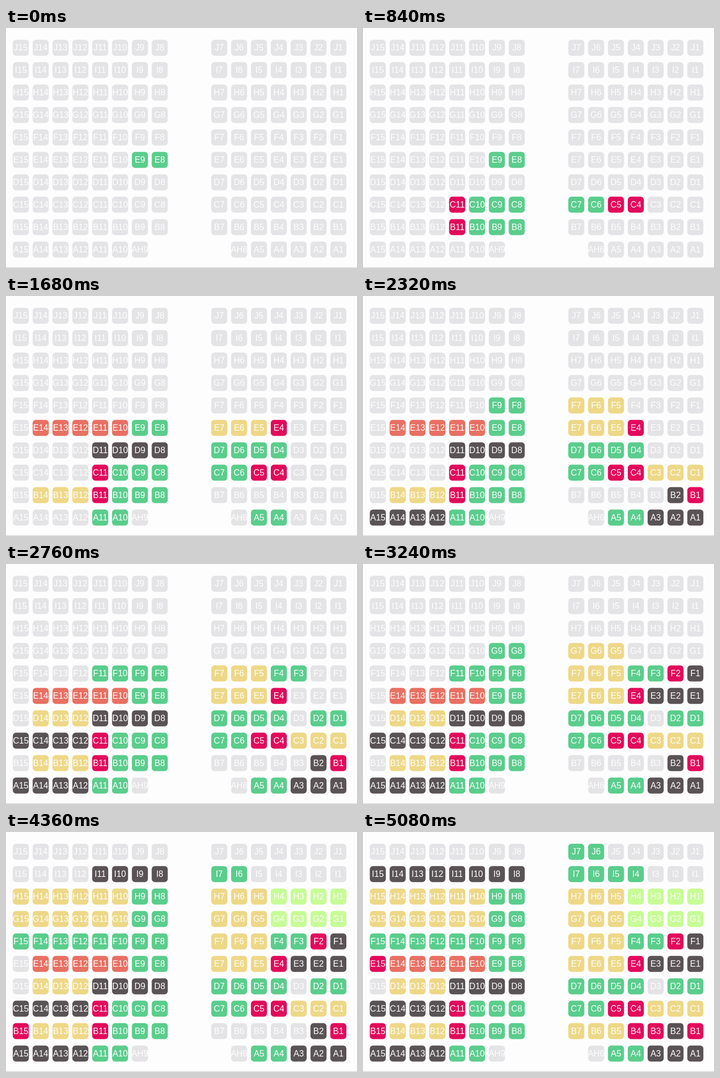
An HTML page for the animation above (5120 ms loop, 656 by 449 pixels).

```html
<!DOCTYPE html>
<html lang="en">
<head>
<meta charset="utf-8">
<title>Seat bookings</title>
<style>
  html, body { margin: 0; width: 100%; height: 100%; overflow: hidden; background: #fefdfe; }
  svg { display: block; }
  text { font: 16px "Liberation Sans", Arial, sans-serif; fill: #fefdfe; text-anchor: middle; }
</style>
</head>
<body>
<svg id="hall" width="656" height="449" viewBox="0 0 656 449">
  <rect y="447.5" width="656" height="1.5" fill="#dddcde"/>
</svg>
<script>
const LOOP = 5120, INTERVAL = 100, LEAD = 50;
const FREE = '#e4e3e5';
const COLOR_BY_SIZE = {
  1: '#e20a5b', 2: '#5acd8c', 3: '#edd887', 4: '#5a5355', 5: '#e87062', 8: '#c7fc96'
};

// One party per entry, in order of arrival; "E14-10" is a run of seats, "+" joins runs.
const bookings = `
  E9-8 C9-8 C7-6 B9-8 C10+B10 C11 B11 C5 C4
  E7-5 D11-8 D7-6 D5-4 E4 B14-12 A11-10 E14-10 A5-4
  A15-12 F9-8 A3-1+B2 B1 F7-5 C3-1
  C15-12 F11-10 D14-12 D2-1 F4-3 F1+E3-1 G9-8 F2 G7-5
  H9-8 F13-12 G12-10 H4-1+G4-1 F15-14 G15-13 H7-5 B15 I11-8 H12-10 I7-6 H15-13
  I5-4 I15-12 E15 B7-5 B4 J7-6 B3
`.trim().split(/\s+/).map(party => party.split('+').flatMap(expandRun));

function expandRun(run) {
  const [first, last = first] = run.slice(1).split('-').map(Number);
  return Array.from({ length: first - last + 1 }, (_, i) => run[0] + (first - i));
}

const hall = document.getElementById('hall');
const seats = {};

function add(tag, attributes, content = '') {
  const node = document.createElementNS('http://www.w3.org/2000/svg', tag);
  for (const name in attributes) node.setAttribute(name, attributes[name]);
  node.textContent = content;
  return hall.appendChild(node);
}

[...'JIHGFEDCBA'].forEach((row, r) => {
  for (let number = 15; number >= 1; number--) {
    const id = row + number;
    if (id === 'A8' || id === 'A7') continue;
    const column = 15 - number + (number < 8 ? 2 : 0);
    const x = 27.7 + 37.09 * column, y = 36.9 + 41.96 * r;
    const label = id === 'A9' || id === 'A6' ? 'AH' + number : id;
    seats[id] = add('rect', { x: x - 15, y: y - 15, width: 30, height: 30, rx: 6, fill: FREE });
    add('text', { x, y: y + 5.5 }, label);
  }
});

function draw(now) {
  const time = now % LOOP;
  for (const id in seats) seats[id].setAttribute('fill', FREE);
  bookings.forEach((party, i) => {
    if (time < i * INTERVAL - LEAD) return;
    for (const id of party) seats[id].setAttribute('fill', COLOR_BY_SIZE[party.length]);
  });
}

const start = performance.now();
function tick() {
  draw(performance.now() - start);
  requestAnimationFrame(tick);
}
tick();
</script>
</body>
</html>
```
